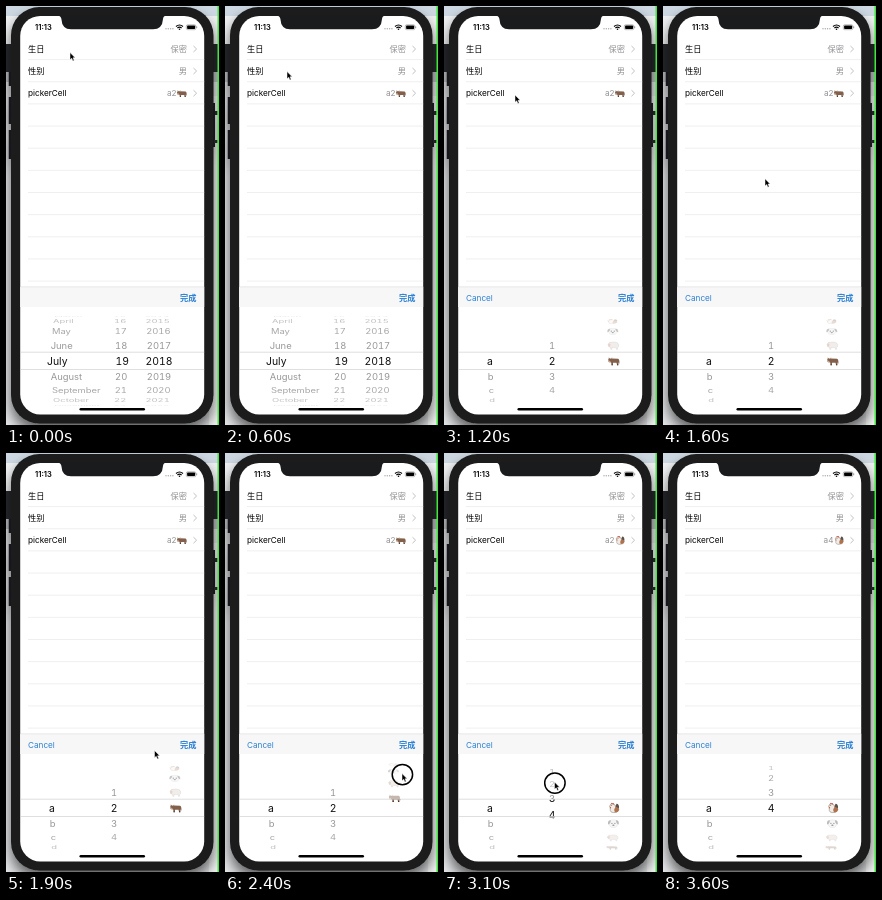
Animation of 213x419 px, one loop 3.7 s. Source, as an HTML page:

```html
<!DOCTYPE html>
<html lang="zh">
<head>
<meta charset="utf-8">
<title>Picker cells</title>
<style>
  html, body { margin: 0; width: 100%; height: 100%; overflow: hidden; background: #e6e7e9; }
  svg { display: block; width: 100vw; height: 100vh; }
  text { font-family: Inter, "Noto Sans CJK SC", "Noto Sans CJK", sans-serif; font-size: 8.2px; }
  .value { fill: #929295; text-anchor: end; }
  .action { fill: #2b80d3; }
  .done { font-weight: 600; }
  .wheel { font-variant-numeric: tabular-nums; fill: #111; }
  .outer text { font-size: 9.4px; }
  .inner text { font-size: 10.4px; }
</style>
</head>
<body>
<svg viewBox="0 0 213 419" preserveAspectRatio="none">
  <defs>
    <clipPath id="band"><path d="M14 346.3H198V363.4H14Z"/></clipPath>
    <clipPath id="around"><path d="M14 301H198V346.3H14ZM14 363.4H198V400H14Z"/></clipPath>
    <filter id="shadow" x="-20%" y="-10%" width="140%" height="120%">
      <feDropShadow dx="0" dy="8" stdDeviation="7" flood-opacity=".6"/>
    </filter>
    <g id="ox">
      <path d="M-5-1.2L-4.2-2.8L-3-1.9L-1.8-2.8L-1.6-2.2L3.6-2Q4.9-1.7 4.7 2.2H4.2L4 .6L3.7 3.6H2.7L2.2 1.5H-.8L-1.1 3.6H-2.1L-2.5 1.4L-4.6.9Z" fill="#82604c"/>
      <path d="M-4.9-1.7L-4.6-3.4L-3.9-2ZM-2.4-2L-1.4-3.5L-1.6-1.7Z" fill="#cfc2ad"/>
      <ellipse cx="-4" cy=".5" rx="1" ry=".7" fill="#cda896"/>
      <path d="M-2.1 2.9H-1.1V3.7H-2.1ZM2.7 2.9H3.7V3.7H2.7Z" fill="#3f2f28"/>
    </g>
    <g id="rooster">
      <path d="M-3.6-1.4Q-3.4-4-1.2-3.8Q1-3.6 1.4-1.2Q4.2-1.6 4.2 1.2Q3.8 4-.2 4Q-3.8 3.8-3.2 1Z" fill="#f1ece6" stroke="#8d827b" stroke-width=".5"/>
      <path d="M1-.6Q4.4-2 4.4 1.2Q4 3.8.8 3.7Q-.4 1.4 1-.6Z" fill="#b0714d"/>
      <path d="M1.2-1.2L2.2-3.8Q4.6-3.8 4.4.2Z" fill="#5a514b"/>
      <path d="M-2.6-3.4L-2-4.5L-1.2-3.9L-.3-4.4L.1-3ZM-3.5-.9H-2.5L-2.9.9Z" fill="#cf4a38"/>
      <path d="M-3.5-2.2L-4.5-1.5L-3.4-1.3Z" fill="#d9a143"/>
      <circle cx="-2" cy="-2.1" r=".4"/>
    </g>
    <g id="dog">
      <circle r="3.6" fill="#eeeceb" stroke="#aaa" stroke-width=".35"/>
      <path d="M-2.2-3.2Q-5-3.8-4.7.8Q-3.4.8-2.5-1.5ZM2.2-3.2Q5-3.8 4.7.8Q3.4.8 2.5-1.5Z" fill="#696461"/>
      <circle cx="-1.3" cy="-.4" r=".6"/><circle cx="1.3" cy="-.4" r=".6"/>
      <ellipse cy="1.3" rx="1" ry=".7"/>
    </g>
    <g id="sheep">
      <path d="M-4.6-.8Q-3.8-3.6-1.5-2.7Q3.8-3.8 4.6-.4Q4.8 2 3.6 2.2V3.8H2.6V2.2H-1.3V3.8H-2.3V2Q-4.5 2-4.6-.8Z" fill="#dfd6cf" stroke="#a89c93" stroke-width=".4"/>
      <path d="M-4.7-.8Q-3.6-2.4-2.5-.9Q-2.7 1.6-3.7 1.6Q-4.6 1.4-4.7-.8Z" fill="#c99c8a"/>
    </g>
  </defs>

  <!-- desktop behind the phone -->
  <path d="M0 0H213V10H0Z" fill="#cdd8e2"/>
  <path d="M0 10H213V38H0Z" fill="#eff0f1"/>
  <path d="M0 38H213V66H0Z" fill="#27282d"/>
  <path d="M0 66H213V76H0Z" fill="#bfc1c4"/>
  <path d="M203 90H213V419H203Z" fill="#f3f4f4"/>

  <!-- phone -->
  <g filter="url(#shadow)">
    <path d="M2.8 66H7V80H2.8ZM2.8 91H7V118H2.8ZM2.8 124H7V153H2.8ZM205 97H209V141H205Z" fill="#18191b"/>
    <rect x="5" y="1" width="202.5" height="416.5" rx="28.5" fill="#1a1b1c"/>
  </g>
  <path d="M209 105H211.6V109H209ZM208 134H211.6V137H208Z" fill="#222"/>
  <path d="M211.5 0H213V419H211.5Z" fill="#3fe83a"/>
  <rect x="14.2" y="10" width="184" height="398.4" rx="20" fill="#fff"/>
  <path d="M52 9.5Q55 10 55.4 13Q56 23.3 65 23.3H147Q156.4 23.3 157 13Q157.2 10 160 9.5Z" fill="#1a1b1c"/>
  <text x="29" y="24" style="font-size:7.6px;font-weight:600">11:13</text>
  <g fill="#aaa"><circle cx="160" cy="22.8" r=".7"/><circle cx="162.3" cy="22.8" r=".7"/><circle cx="164.6" cy="22.8" r=".7"/><circle cx="166.9" cy="22.8" r=".7"/></g>
  <path d="M170 20.5Q173.5 17.4 177 20.5M171.4 22Q173.5 20.2 175.6 22" fill="none" stroke="#000" stroke-width="1.1"/>
  <circle cx="173.5" cy="23.2" r=".8"/>
  <rect x="180.3" y="18.8" width="9.6" height="4.9" rx="1.4" fill="none" stroke="#777" stroke-width=".5"/>
  <rect x="181.1" y="19.6" width="8" height="3.3" rx=".7"/>
  <path d="M190.7 20.4V22.1" stroke="#777" stroke-width=".7"/>

  <path id="lines" stroke="#e4e4e5" stroke-width=".6"/>
  <path d="M187.5 40L190.6 43L187.5 46M187.5 62L190.6 65L187.5 68M187.5 84.2L190.6 87.2L187.5 90.2" fill="none" stroke="#c1c1c5" stroke-width="1"/>
  <text x="22" y="46.1">生日</text>
  <text x="22" y="68.2">性别</text>
  <text x="22" y="90.1">pickerCell</text>
  <text class="value" x="181" y="46.1">保密</text>
  <text class="value" x="181" y="68.2">男</text>
  <text class="value" id="choice" x="170.5" y="90.1"></text>
  <use id="animal" x="176" y="87.4"/>

  <!-- input view -->
  <path d="M14.2 281H198.2V301H14.2Z" fill="#f7f7f8"/>
  <path d="M14.2 280.8H198.2" stroke="#d5d5d7" stroke-width=".5"/>
  <text class="action" id="cancel" x="22" y="295.2">Cancel</text>
  <text class="action done" x="174" y="295.4">完成</text>
  <g class="wheel outer" id="outer" clip-path="url(#around)"></g>
  <g class="wheel inner" id="inner" clip-path="url(#band)"></g>
  <path d="M14.2 346.2H198.2M14.2 363.5H198.2" stroke="#c9c9cb" stroke-width=".6"/>
  <rect x="73.5" y="402" width="65.5" height="2.5" rx="1.25"/>

  <g id="cursor">
    <circle id="press" cx=".4" cy=".6" r="10.2" fill="#fff" fill-opacity=".4" stroke="#000" stroke-width="1.5"/>
    <path d="M0-.5V6.8L1.7 5.3L2.9 8L4.2 7.4L3 4.8H5.2Z" stroke="#fff" stroke-width=".5"/>
  </g>
</svg>
<script>
const $ = id => document.getElementById(id);
const LOOP = 3700, STEP = 100, MID = 355, RADIUS = 45, ANGLE = 20.5 * Math.PI / 180;

$('lines').setAttribute('d',
  Array.from({ length: 11 }, (_, i) => `M22 ${53.6 + i * 22.15}H198.2`).join(''));

// Keys are [time, ...values]; values between keys are linear.
function track(keys, t) {
  const i = keys.findIndex(k => k[0] > t);
  if (i < 0) return keys.at(-1).slice(1);
  if (!i) return keys[0].slice(1);
  const a = keys[i - 1], b = keys[i], u = (t - a[0]) / (b[0] - a[0]);
  return a.slice(1).map((v, n) => v + (b[n + 1] - v) * u);
}
const within = (t, spans) => spans.some(([a, b]) => t >= a && t <= b);

const pointer = [
  [0, 64, 47], [200, 64, 48], [600, 62, 66], [800, 62, 67], [1200, 71, 89.5],
  [1400, 71, 90], [1900, 148.5, 298], [2200, 176.5, 337], [2400, 177, 321],
  [2700, 176, 368], [2900, 111, 355], [3100, 110.5, 329.5], [3300, 110.5, 322], [3600, 230, 300]
];
const presses = [[700, 700], [1100, 1100], [2200, 2700], [2900, 3200]];
const digitPos = [[2900, 1], [3100, 2.56], [3300, 2.95], [3400, 3]];
const animalPos = [[2200, 3], [2400, 3.62], [2500, 2.8], [2700, .4], [2900, 0]];

const text = (s, anchor) => `<text y="3.5" text-anchor="${anchor}">${s}</text>`;
const column = (items, pos, x, anchor = 'middle', drift = () => 0) =>
  ({ items: items.map(s => text(s, anchor)), pos, x, drift });
const range = start => Array.from({ length: 9 }, (_, i) => start + i);

const months = 'March April May June July August September October November'.split(' ');
const dateColumns = [
  column(months, 4, 41, 'start', k => 2.5 + 1.2 * k),
  column(range(15), 4, 123, 'end', k => -1.2 - .5 * k),
  column(range(2014), 4, 153, 'middle', k => -.7 * (k - 1))
];
const genderColumns = [column(['男', '女'], 0, 106.5)];
const animals = ['rooster', 'dog', 'sheep', 'ox'];

const customColumns = t => [
  column([...'abcd'], 0, 46, 'middle', k => .7 * k),
  column([...'1234'], track(digitPos, t)[0], 108),
  {
    items: animals.map(a => `<use href="#${a}" transform="scale(1.15)"/>`),
    pos: track(animalPos, t)[0], x: 170, drift: k => -.6 * k
  }
];

function drawWheels(columns) {
  let outer = '', inner = '';
  for (const { items, pos, x, drift } of columns) {
    items.forEach((item, i) => {
      const d = i - pos, k = Math.abs(d), c = Math.cos(d * ANGLE);
      if (c < .05) return;
      const y = MID + RADIUS * Math.sin(d * ANGLE);
      if (k > .3) outer += `<g transform="translate(${x + drift(k)} ${y}) scale(1 ${c})"
        opacity="${.46 * c ** .8}">${item}</g>`;
      if (k < 1) inner += `<g transform="translate(${x} ${MID + d * 16.5})">${item}</g>`;
    });
  }
  $('outer').innerHTML = outer;
  $('inner').innerHTML = inner;
}

function draw(t) {
  const dates = t < 800;
  drawWheels(dates ? dateColumns : t < 1200 ? genderColumns : customColumns(t));
  $('cancel').style.display = dates ? 'none' : '';
  $('choice').textContent = t < 3400 ? 'a2' : 'a4';
  $('animal').setAttribute('href', t < 3000 ? '#ox' : '#rooster');
  $('cursor').setAttribute('transform', `translate(${track(pointer, t)})`);
  $('press').style.display = within(t, presses) ? '' : 'none';
}

let last = -1;
function tick() {
  const t = Math.floor(performance.now() % LOOP / STEP) * STEP;
  if (t !== last) draw(last = t);
  requestAnimationFrame(tick);
}
tick();
</script>
</body>
</html>
```
